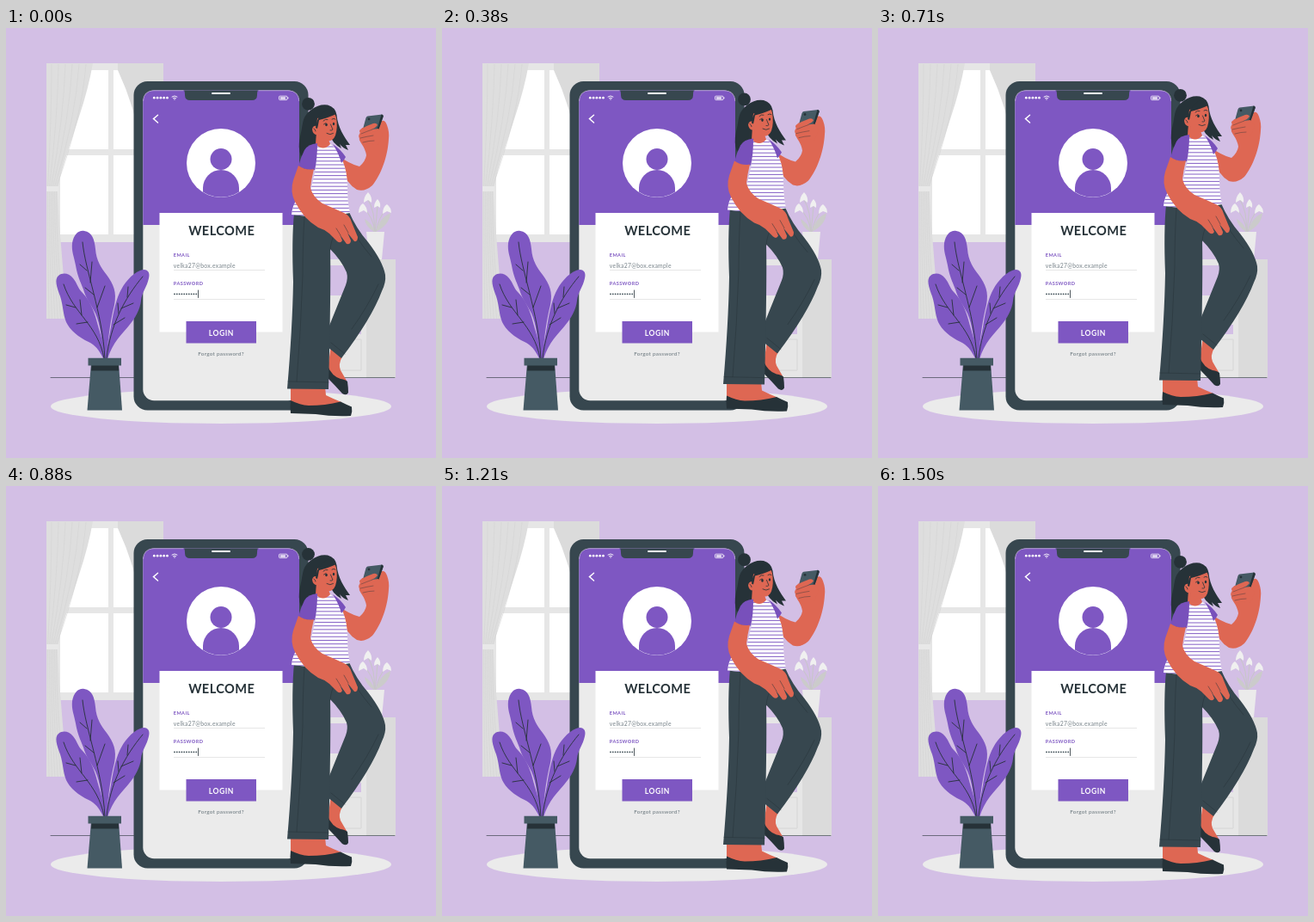
Write an HTML page that moves like this. It is 500x500 px and loops after 1540 ms.

```html
<!DOCTYPE html>
<html lang="en">
<head>
<meta charset="utf-8">
<title>Welcome</title>
<style>
html, body { margin: 0; width: 100%; height: 100%; overflow: hidden; background: #d3bfe5; }
svg { display: block; width: 100%; height: 100%; }
text { font-family: Lato, "Open Sans", sans-serif; }
.purple { fill: #7e57c2; }
.slate { fill: #37474f; }
.ink { fill: #263238; }
.skin { fill: #de6753; }
.line { fill: none; stroke: #263238; stroke-linecap: round; stroke-linejoin: round; }
.white { fill: #fff; }
</style>
</head>
<body>
<svg viewBox="0 0 500 500">
<defs>
  <clipPath id="screen"><rect x="159.3" y="72.5" width="181.7" height="360.8" rx="13"/></clipPath>
  <clipPath id="disc"><circle cx="250" cy="157" r="39.7"/></clipPath>
  <clipPath id="shirt"><path d="M361 134Q369 143 377 135L388 143L392 156Q397 168 397 185Q397 203 400 215Q367 222 332 217Q333 206 338 200L354 190L360 164Z"/></clipPath>
</defs>

<g id="window">
  <path d="M56 41H183V249H56Z" fill="#e6e6e6"/>
  <path class="white" d="M63 49H119V141H63ZM125 49H160V141H125ZM63 148H119V240H63ZM125 148H160V240H125Z"/>
  <path d="M130 41H183V140H158Q150 92 130 49Z" fill="#dbdbdb"/>
  <path d="M47 41H101Q96 70 85 103C76 132 65 160 61 184L60 191C62 240 68 290 70 338H47Z" fill="#dedede"/>
  <g fill="none" stroke="#d3d3d3" stroke-width=".6" id="folds"></g>
  <path d="M47 184H61V190H47Z" fill="#e8e8e8"/>
</g>

<g id="cabinet">
  <path d="M340 269H453V407H340Z" fill="#dbdbdb"/>
  <path d="M340 269H419V407H340Z" fill="#e6e6e6"/>
  <path d="M345 276H404V311H345ZM345 345H413V356H345Z" fill="#d3bfe5"/>
  <path d="M350 362H413V398H350Z" fill="none" stroke="#d6d6d6"/>
  <path d="M419 237H440L437 269H422Z" fill="#ebebeb"/>
  <path d="M428 237Q430 214 420 198M429 237Q427 220 416 210M430 237Q434 219 442 211M429 237Q431 220 432 206" fill="none" stroke="#c7c7c7"/>
  <path d="M428 237Q418 231 417 222Q425 226 429 237M430 237Q434 221 447 215Q446 229 430 237" fill="#cbcbcb"/>
  <g fill="#f0f0f0">
    <path d="M421 191Q426 196 425 203L421 200L416 203Q416 196 421 191Z"/>
    <path d="M415 204Q420 208 420 215L416 212L410 215Q410 207 415 204Z"/>
    <path d="M432 199Q436 203 435 209L432 207L428 209Q428 203 432 199Z"/>
    <path d="M443 205Q448 209 448 215L443 213L438 216Q438 208 443 205Z"/>
  </g>
</g>

<path class="line" d="M52 406.5H452" stroke-width=".6"/>
<ellipse cx="250" cy="440" rx="198" ry="20" fill="#ebebeb"/>

<g id="handset">
  <rect class="slate" x="148.5" y="62" width="203" height="382.5" rx="16"/>
  <g clip-path="url(#screen)">
    <path d="M159 72H341V434H159Z" fill="#ebebeb"/>
    <path class="purple" d="M159 72H341V229H159Z"/>
    <path class="slate" d="M206 70Q208 73 208 78Q208 84 214 84H286Q292 84 292 78Q292 73 294 70Z"/>
  </g>
  <path d="M206 72.8H172Q159.6 72.8 159.6 85M294 72.8H328Q340.7 72.8 340.7 85" fill="none" stroke="#d3bfe5" stroke-width=".5"/>
  <path d="M240 76H260" stroke="#fff" stroke-width="2" stroke-linecap="round"/>
  <g class="white" id="signal"></g>
  <g fill="none" stroke="#fff" stroke-linecap="round">
    <path d="M193 80Q196 77.7 199 80M194.4 81.6Q196 80.4 197.6 81.6" stroke-width=".9"/>
    <path d="M176.5 101.2L171.5 105.6L176.5 110" stroke-width="1.5"/>
  </g>
  <circle class="white" cx="196" cy="83" r=".7"/>
  <rect x="317.5" y="79.2" width="9.5" height="4.4" rx="1" fill="none" stroke="#fff" stroke-width=".8"/>
  <path class="white" d="M318.8 80.4H325V82.4H318.8ZM327.4 80.5H328.4V82.3H327.4Z"/>

  <circle class="white" cx="250" cy="157" r="40"/>
  <g class="purple" clip-path="url(#disc)">
    <circle cx="250" cy="152.5" r="12.5"/>
    <path d="M229 200V186A21 21 0 0 1 271 186V200Z"/>
  </g>

  <path class="white" d="M178.5 215H321.5V353.5H178.5Z"/>
  <text class="ink" x="250.7" y="241.2" font-size="14.6" font-weight="700" letter-spacing=".4" text-anchor="middle">WELCOME</text>
  <g class="purple" font-size="5.6" font-weight="700" letter-spacing=".4">
    <text x="194.8" y="266">EMAIL</text>
    <text x="194.8" y="299.3">PASSWORD</text>
  </g>
  <text x="194.8" y="278.8" font-size="6.8" letter-spacing=".3" fill="#78838a">velka27@box.example</text>
  <path d="M195 281.5H301M195 315.5H301" stroke="#dcdcdc" stroke-width=".7"/>
  <g class="slate" id="secret"></g>
  <path class="line" d="M223.5 305V313.5" stroke-width=".8"/>
  <path class="purple" d="M209.5 341H291V366.5H209.5Z"/>
  <text class="white" x="250.3" y="357.6" font-size="8.6" font-weight="700" letter-spacing=".5" text-anchor="middle">LOGIN</text>
  <text x="250" y="380.5" font-size="6.4" letter-spacing=".25" text-anchor="middle" fill="#66737a">Forgot password?</text>
</g>

<g id="plant">
  <path class="purple" d="M113 384C108 374 104 369 96 365C85 360 74 351 70 342C66 332 67 325 63 312C59 301 56 292 61 288C66 284 73 285 78 291C83 297 83 302 89 308C97 316 102 328 105 339C109 354 113 365 116 384Z"/>
  <path class="purple" d="M114 384C111 361 110 346 104 332C98 320 93 315 90 304C86 294 83 288 81 276C79 265 76 260 77 250C79 240 84 235 91 236C100 237 103 246 104 257C105 271 111 279 117 287C125 298 129 307 126 322C122 338 119 356 117 384Z"/>
  <path class="purple" d="M115 385C118 369 120 359 122 348C124 335 127 319 132 308C137 297 146 286 156 282C164 279 168 284 166 291C164 301 158 307 157 317C156 327 150 338 143 346C135 356 124 365 118 385Z"/>
  <g class="line" stroke-width=".9">
    <path d="M89 249C92 282 112 330 115 384M94 282L86 275M102 310L92 302M98 296L100 272M106 325L115 300"/>
    <path d="M67 298C78 332 107 345 114 384M81 325L70 322M95 342L82 344M88 334L86 316"/>
    <path d="M159 289C138 314 121 346 117 384M141 313L142 301M131 332L130 320M134 326L148 320M125 345L138 337"/>
  </g>
  <path d="M99 390H131L135 444.5H94.5Z" fill="#455a64"/>
  <path class="ink" d="M99.6 391H130.8L131.2 398.5H99Z"/>
  <path d="M95.5 383.7H134V392.5H95.5Z" fill="#455a64"/>
</g>

<g id="woman">
  <!-- back foot and leg -->
  <path class="skin" d="M378 369L391 382Q386 391 389 398L396 410L388 413L374 396Z"/>
  <path class="ink" d="M374 393Q379 405 389 408Q395 409 397 411Q398 418 398 424Q396 428 391 425Q383 416 375 408Z"/>
  <path class="slate" d="M362 217L399 214Q407 233 421 249Q438 271 441 287Q442 296 437 306Q425 338 390 384L374 371L376 346L395 299Q398 291 396 284Q390 270 376 256Z"/>
  <path class="line" d="M378 366L394 379M394 220Q407 245 425 266M433 298Q420 325 402 350" stroke-width=".5"/>
  <!-- front foot and leg -->
  <path class="skin" d="M331 417H371L372 427Q380 431 390 435L386 441H331Z"/>
  <path class="ink" d="M331 433Q342 438.5 352 439Q371 439 389 434.5Q396 438 402 440.5Q403 446 401 451Q380 452 360 449L331 448Q330 440 331 433Z"/>
  <path class="slate" d="M335 215H385L377 258Q378 300 375 420L327 419.5Q333 350 334 295Q332 247 335 215Z"/>
  <path class="line" d="M347 220Q345 250 345 287Q343 350 338 411M328 411L375 412M377 258Q378 245 383 239" stroke-width=".5"/>

  <!-- far arm with the handset -->
  <path class="skin" d="M386 148Q399 158 411 161Q418 155 419 148Q418 141 413 134Q410 129 411 124L414 116L434 117Q434 110 437 108Q441 107 443 113Q446 121 445 129C444 149 436 171 426 183Q417 191 408 188Q396 181 389 162Z"/>
  <g transform="translate(-.5 1.4)">
    <path d="M421 101L438 99Q440 100 439 102L434 116Q433 118 431 118L417 117Q415 116 416 114L419 103Q420 101 421 101Z" fill="#455a64"/>
    <path class="ink" d="M437 99Q440 100 439 102L434 116Q433 118 430 118Q432 116 433 113Z"/>
    <circle class="ink" cx="422.5" cy="104.5" r="1.4"/>
  </g>
  <path class="skin" d="M412 118Q418 114 427 111Q431 110 432 113Q430 116 425 118L433 117L438 124L433 136L414 133Q410 131 411 128Q409 125 412 122Q410 120 412 118Z"/>
  <path class="line" d="M413 123Q420 120 426 118M412 128Q420 126 427 125M415 133Q422 131 428 131" stroke-width=".4"/>

  <!-- hair behind the face -->
  <circle class="ink" cx="351.5" cy="88.3" r="7.4"/>
  <path class="ink" d="M355 95Q364 88 374 89.5Q383 92 384.5 101C386 116 393 126 400 136L395 136L398 142Q392 140 388 135L390 140Q379 134 376 123L371 137Q362 138 357 136Q349 145 343 149Q339 139 342 126C346 112 343 104 355 95Z"/>

  <!-- neck and shirt -->
  <g clip-path="url(#shirt)">
    <path class="white" d="M330 130H404V222H330Z"/>
    <path id="stripes" stroke="#7e57c2" stroke-width=".95" fill="none"/>
  </g>
  <path class="skin" d="M361 120L374 127L377 135Q369 144 360 135Z"/>
  <path fill="#7850bb" d="M380 135Q389 141 395 150Q393 154 390 157Q387 146 380 135Z"/>
  <path fill="#7850bb" d="M362 134Q351 135 347 142Q342 152 340 161Q349 166 359 165Q362 153 362 134Z"/>

  <!-- face -->
  <path class="skin" d="M362 105Q370 104 375 95Q382 96 384 104Q386 116 383 125Q380 132 374 131Q367 130 363 124Q357 125 356 118Q357 113 361 114Z"/>
  <path class="ink" d="M360 116Q361 102 373 95Q378 92 384 100Q373 105 364 107Q363 113 362 117Z"/>
  <g class="ink"><ellipse cx="372.5" cy="112.5" rx="1.3" ry="1.8"/><ellipse cx="381" cy="111.5" rx="1.2" ry="1.7"/></g>
  <path class="line" d="M369 108Q371 105.5 374 106.5M379 106Q381 104.5 383 106M369.5 112L372 110.5M377.5 112Q379 116 380 118Q379 119.5 377 119M373 122.5Q377 125 380.5 122.5M358 117Q360 118 360 120" stroke-width=".8"/>

  <!-- near arm -->
  <path class="skin" d="M340 160Q349 166 358 164Q355 176 354 186Q357 197 368 204Q382 210 393 215Q400 218 402 226L409 243Q409 249 405 248L397 238L401 247Q401 252 396 251L388 240L391 247Q389 251 385 248L376 239Q370 234 363 232Q346 222 336 202Q330 190 334 177Z"/>
  <path class="line" d="M398 238L393 229M389 241L384 233" stroke-width=".5"/>
</g>
</svg>

<script>
const $ = id => document.getElementById(id);
const range = (n, make) => Array.from({ length: n }, (_, i) => make(i)).join('');
const dots = (n, x, gap, y, r) =>
  range(n, i => `<circle cx="${x + i * gap}" cy="${y}" r="${r}"/>`);

$('signal').innerHTML = dots(5, 172.3, 3.8, 81.2, 1.35);
$('secret').innerHTML = dots(10, 196, 2.8, 309.3, 0.9);
$('stripes').setAttribute('d', range(20, i => `M330 ${138 + i * 4.2}H404`));
$('folds').innerHTML = range(6, i => {
  const top = 53 + i * 8, tie = 48.5 + i * 2, foot = 50 + i * 3.4;
  return `<path d="M${top} 42Q${top - i} 105 ${tie} 185M${tie} 190Q${tie} 260 ${foot} 338"/>`;
});

const LOOP = 1540, PEAK = 725, REST = 1460, LIFT = 10;
const ease = p => (1 - Math.cos(Math.PI * p)) / 2;

function draw(now) {
  const t = now % LOOP;
  const rise = t < PEAK
    ? ease(t / PEAK)
    : 1 - ease(Math.min(1, (t - PEAK) / (REST - PEAK)));
  $('woman').setAttribute('transform', `translate(0 ${(-LIFT * rise).toFixed(3)})`);
}

let start;
function tick(now) {
  start ??= now;
  draw(now - start);
  requestAnimationFrame(tick);
}
draw(0);
requestAnimationFrame(tick);
</script>
</body>
</html>
```
